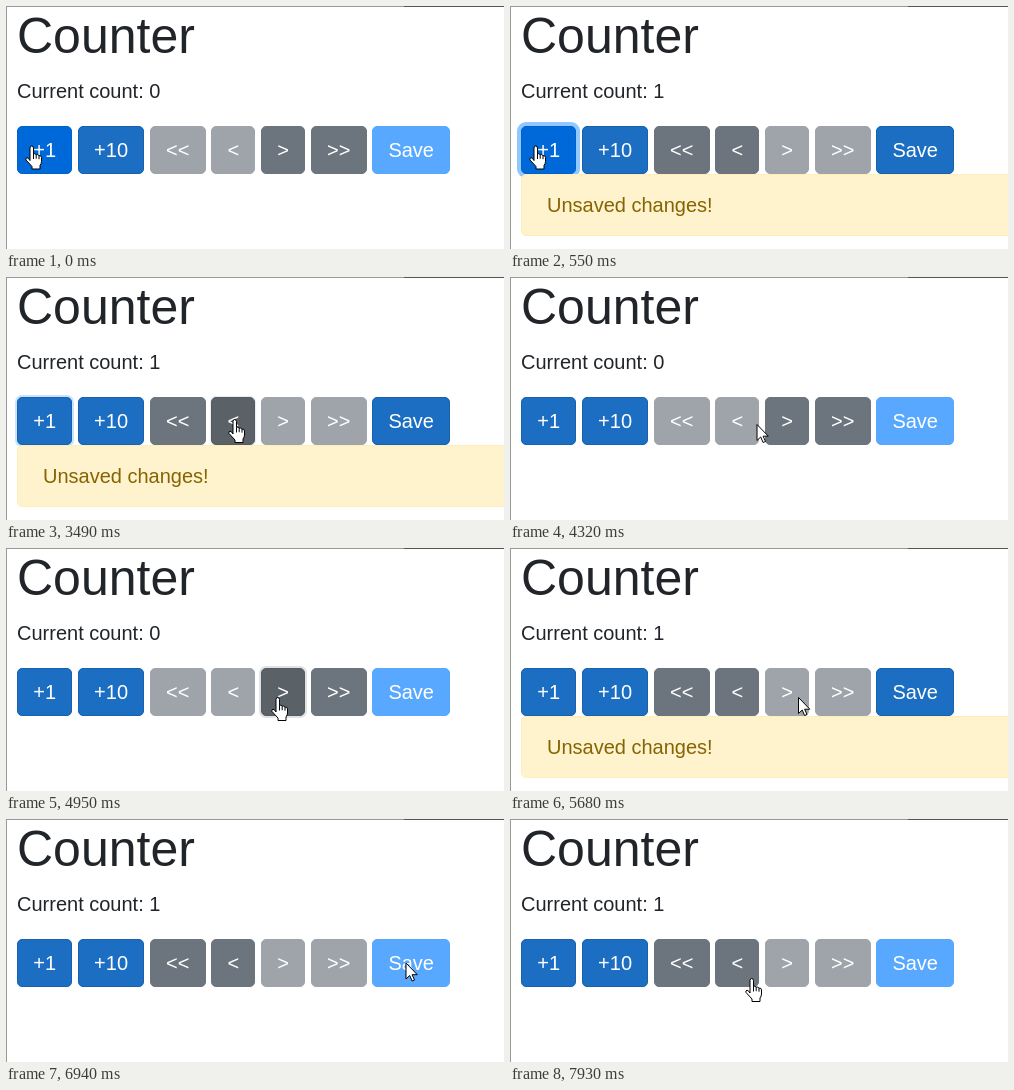
Write an HTML page that moves like this. It is 498 px wide and 243 px high and loops after 8000 ms.

```html
<!DOCTYPE html>
<html lang="en">
<head>
<meta charset="utf-8">
<title>Counter</title>
<style>
  * { box-sizing: border-box; }
  html, body { margin: 0; width: 100%; height: 100%; overflow: hidden; background: #fff; }
  #stage {
    position: relative; width: 498px; height: 243px; overflow: hidden;
    font: 20px/30px "Liberation Sans", Arial, sans-serif; color: #212529;
  }
  #stage > * { position: absolute; margin: 0; white-space: nowrap; }
  .edge { background: #999; }
  h1 { left: 11px; top: 0; font-size: 50px; line-height: 60px; font-weight: 400; }
  p { left: 11px; top: 70px; }
  #row { left: 11px; top: 120px; display: flex; gap: 5.56px; }
  .btn {
    height: 48px; padding: 8px 15.25px; border: 1px solid #6c757d; border-radius: 5px;
    background: #6c757d; color: #fff;
  }
  .btn.hover { background: #5a6268; border-color: #545b62; }
  .btn.primary { background: #1b6ec2; border-color: #1861ac; }
  .btn.primary.hover { background: #0069d9; border-color: #0062cc; }
  .btn.primary.press { background: #0062cc; border-color: #005cbf; }
  .btn.off { opacity: .65; }
  .btn.primary.off { background: #007bff; border-color: #007bff; }
  #alert {
    left: 11px; top: 168px; width: 600px; height: 62px; padding: 15px 25px;
    border: 1px solid #ffeeba; border-radius: 5px; background: #fff3cd; color: #856404;
  }
  svg { left: 0; top: 0; overflow: visible; fill: #fff; stroke: #000; stroke-linejoin: round; }
</style>
</head>
<body>
<div id="stage">
  <div class="edge" style="left:0;top:0;width:1px;height:243px"></div>
  <div class="edge" style="left:0;top:0;width:498px;height:1px"></div>
  <div class="edge" style="left:398px;top:0;width:100px;height:1px;background:#555"></div>
  <h1>Counter</h1>
  <p>Current count: <span id="count">0</span></p>
  <div id="row"></div>
  <div id="alert">Unsaved changes!</div>
  <svg id="cursor" width="18" height="25">
    <path id="arrow" d="M.5 .5V16.5L4.2 13L6.6 18.5L9 17.5L6.6 12.2H11.8Z"/>
    <g id="hand">
      <path d="M5 15V2.5Q5 .5 6.7 .5T8.5 2.5V8.5Q10 7.4 11.2 9.2Q13 8.4 14 10.2Q16.5 9.6 16.5 12V16Q16.5 18 15 20V23.5H7V21L1 14.5Q.3 12.6 2 12.2Q3.5 12.2 5 15Z"/>
      <path fill="none" d="M8.5 8.5v5M11.2 9.2v4M14 10.2v3.5"/>
    </g>
  </svg>
</div>
<script>
const LOOP = 8000;
const [ADD1, ADD10, FIRST, UNDO, REDO, LAST, SAVE] = [0, 1, 2, 3, 4, 5, 6];
const $ = id => document.getElementById(id);

const buttons = ['+1', '+10', '<<', '<', '>', '>>', 'Save'].map((label, i) => {
  const el = document.createElement('div');
  el.className = 'btn';
  el.classList.toggle('primary', [ADD1, ADD10, SAVE].includes(i));
  el.textContent = label;
  $('row').append(el);
  return el;
});

// Each track is a list of [start time, ...values], held until the next entry.
const cursorTrack = [
  [0, 'hand', 19, 139.5], [2600, 'hand', 29, 142], [2740, 'hand', 75, 146],
  [2860, 'hand', 140, 147], [2980, 'hand', 207, 147], [3120, 'hand', 216, 145],
  [3240, 'hand', 221, 143], [3360, 'hand', 222, 142], [3630, 'arrow', 228, 143],
  [4320, 'arrow', 246.5, 147], [4450, 'hand', 254, 151], [4570, 'hand', 261, 152],
  [4700, 'hand', 264, 150], [4820, 'hand', 265, 149], [5090, 'arrow', 271, 149],
  [5680, 'arrow', 288, 149], [5820, 'arrow', 330, 145], [5950, 'hand', 380, 139],
  [6090, 'hand', 390, 143], [6240, 'hand', 394, 143.5], [6940, 'arrow', 399.5, 143.5],
  [7510, 'arrow', 376, 148], [7630, 'arrow', 326, 155], [7780, 'arrow', 271, 162],
  [7930, 'hand', 235, 159]
];
const countTrack = [[0, 0], [430, 1], [3630, 0], [5090, 1]];
const unsavedTrack = [[0, false], [430, true], [3630, false], [5090, true], [6940, false]];
const hoverTrack = [
  [0, ADD1], [2740, ADD10], [2860, FIRST], [2980, UNDO], [3630, null],
  [4570, REDO], [5090, null], [6090, SAVE], [6940, null]
];
const ringTrack = [
  [0, {}], [430, { [ADD1]: .5 }], [550, { [ADD1]: 1 }],
  [3490, { [ADD1]: .5, [UNDO]: .3 }], [3630, {}],
  [4950, { [REDO]: .5 }], [5090, {}], [6790, { [SAVE]: 1 }], [6940, {}]
];

const at = (track, t) => track.findLast(entry => entry[0] <= t).slice(1);

function draw(t) {
  const [count] = at(countTrack, t);
  const [unsaved] = at(unsavedTrack, t);
  const [hover] = at(hoverTrack, t);
  const [rings] = at(ringTrack, t);
  const [kind, x, y] = at(cursorTrack, t);
  const enabled = [true, true, count > 0, count > 0, count < 1, count < 1, unsaved];

  $('count').textContent = count;
  $('alert').style.display = unsaved ? '' : 'none';
  buttons.forEach((el, i) => {
    const rgb = el.classList.contains('primary') ? '38,143,255' : '130,138,145';
    const ring = rings[i] || 0;
    el.classList.toggle('off', !enabled[i]);
    el.classList.toggle('hover', hover === i);
    el.classList.toggle('press', i === SAVE && ring > 0);
    el.style.boxShadow = ring ? `0 0 0 ${4 * ring}px rgba(${rgb},${ring / 2})` : 'none';
  });
  for (const id of ['arrow', 'hand']) $(id).style.display = id === kind ? '' : 'none';
  $('cursor').style.transform = `translate(${x}px,${y}px)`;
}

const start = performance.now();
function tick() {
  draw((performance.now() - start) % LOOP);
  requestAnimationFrame(tick);
}
tick();
</script>
</body>
</html>
```
